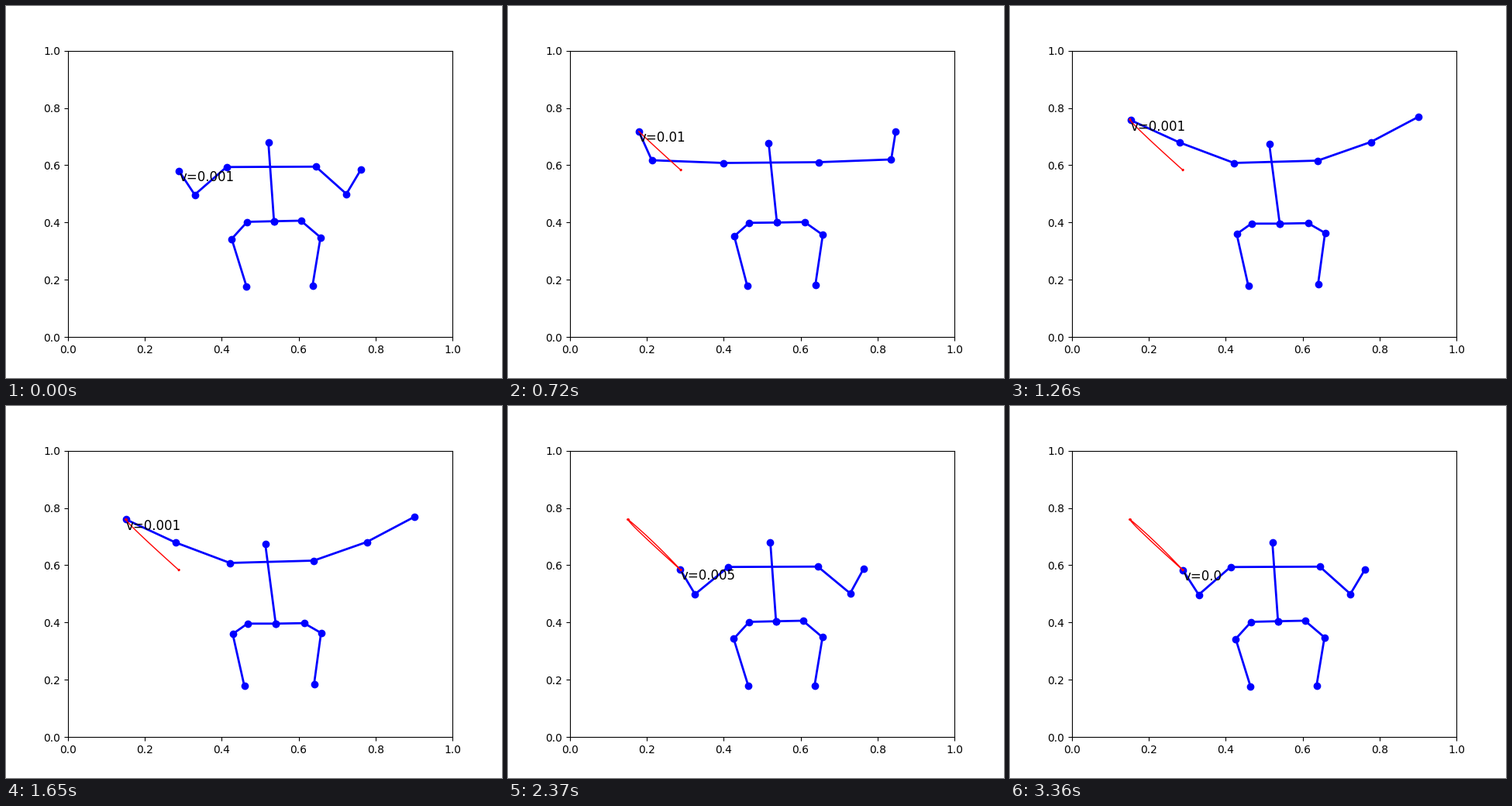
Write a matplotlib script that moves like this. It is 640 by 480 pixels and loops after 3390 ms.

```python
import numpy as np
import matplotlib.pyplot as plt
from matplotlib.animation import FuncAnimation

FRAMES, INTERVAL = 113, 30
STAGE_TO_AXES = np.array([496, -369.6])
N = np.arange(FRAMES)


def pose(*points):
    """Joint points in stage pixels, converted to axes units."""
    return (np.array(points) + 0.5 - (80, 427.2)) / STAGE_TO_AXES


def ease(start, end):
    """Smoothstep from 0 to 1 between two frames."""
    s = np.clip((N - start) / (end - start), 0, 1)
    return s * s * (3 - 2 * s)


def sweep(low, mid, high, u, at=0.55):
    """Parabola through three poses, meeting the middle one at u = at."""
    u = u[:, None, None]
    bend = (mid - low - at * (high - low)) / (at * at - at)
    return low + u * (high - low) + bend * (u * u - u)


# Arm joints run wrist, elbow, shoulder on the left, then back on the right.
ARMS_LOW = pose((222.5, 211.2), (243, 243), (284, 207.3),
                (399.3, 206.8), (438.7, 242), (457.5, 210.5))
ARMS_RISE = pose((168, 161), (185, 198.3), (278, 202),
                 (400, 201), (494, 197.3), (500, 161))
ARMS_HIGH = pose((154.5, 146), (218, 175.5), (288.5, 202),
                 (396.5, 199), (465, 175), (526.5, 142.5))
ARMS_SINK = pose((184, 172.3), (190, 209), (280.3, 204),
                 (399, 203), (494, 206.5), (495, 171))

# Leg joints run ankle, knee, hip, waist and mirrored back.
LEGS_LOW = pose((309.7, 361), (290.7, 300), (310.7, 278), (345.3, 277.2),
                (380, 276.5), (405.3, 298), (395, 360.5))
LEGS_HIGH = pose((307, 360.5), (292, 293.7), (311, 280.3), (347.5, 280.3),
                 (384, 279.7), (406, 292.3), (397, 358.5))
HEAD_LOW, HEAD_HIGH = pose((338, 175), (334, 177.3))

up, down = ease(7, 39), ease(57.5, 80.5)
lift = up - down

arms = np.where((N < 50)[:, None, None],
                sweep(ARMS_LOW, ARMS_RISE, ARMS_HIGH, up),
                sweep(ARMS_LOW, ARMS_SINK, ARMS_HIGH, 1 - down))
legs = LEGS_LOW + lift[:, None, None] * (LEGS_HIGH - LEGS_LOW)
head = HEAD_LOW + lift[:, None] * (HEAD_HIGH - HEAD_LOW)
spine = np.stack([head, legs[:, 3]], axis=1)

wrist = arms[:, 0]
speed = np.hypot(*np.diff(wrist, axis=0, prepend=wrist[:1]).T)
speed[:86] = np.maximum(speed[:86], 0.001)

# The wrist trembles slightly while it is held still.
still = (N < 8) | ((N > 36) & (N < 58))
tremble = np.column_stack([np.sin(2 * N), np.cos(3 * N)]) / STAGE_TO_AXES
wrist += 0.8 * still[:, None] * tremble

CHAINS = [arms, legs, spine]

fig, ax = plt.subplots(figsize=(6.4, 4.8), dpi=100)
ax.set_position([0.125, 0.11, 0.775, 0.77])
ax.set(xlim=(0, 1), ylim=(0, 1))
bones = [ax.plot([], [], "o-", color="blue", lw=2, ms=6)[0] for _ in CHAINS]
trail, = ax.plot([], [], color="red", lw=1)
label = ax.text(0, 0, "", fontsize=12)


def update(n):
    for bone, chain in zip(bones, CHAINS):
        bone.set_data(*chain[n].T)
    trail.set_data(*wrist[:n + 1].T)
    x, y = wrist[n]
    label.set_position((x, y - 0.036))
    label.set_text(f"v={round(float(speed[n]), 3)}")
    return [*bones, trail, label]


anim = FuncAnimation(fig, update, frames=FRAMES, interval=INTERVAL,
                     repeat=True, repeat_delay=0)
plt.show()
```
